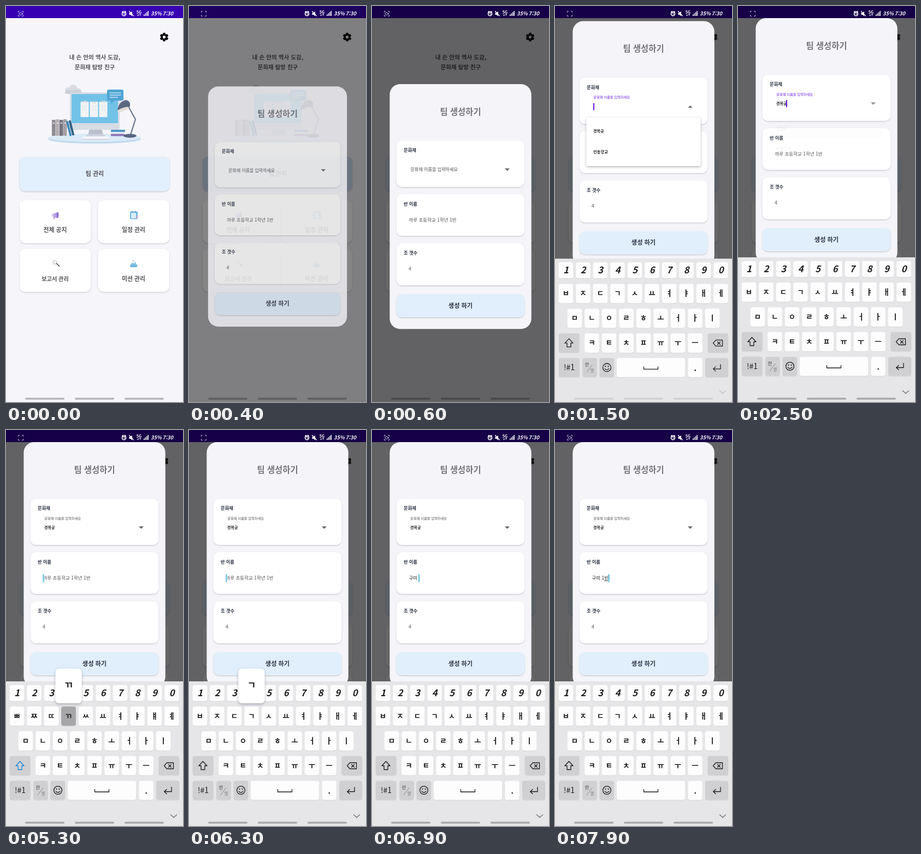
An HTML page for the animation above (8 s loop, 324 by 720 pixels).

```html
<!DOCTYPE html>
<html lang="ko">
<head>
<meta charset="utf-8">
<title>팀 생성하기</title>
<style>
html, body { margin: 0; width: 100%; height: 100%; overflow: hidden; background: #f5f5fa; }
svg { display: block; width: 324px; height: 720px; }
text { font-family: 'Noto Sans CJK KR', 'Noto Sans CJK', sans-serif; white-space: pre; }
.slant { font-style: italic; }
</style>
</head>
<body>
<svg id="stage" viewBox="0 0 324 720" xmlns="http://www.w3.org/2000/svg"></svg>
<script>
const LOOP = 8000;
const stage = document.getElementById('stage');
const $ = id => document.getElementById(id);

// ---------- markup helpers ----------
const box = (x, y, w, h, r, fill, more = '') =>
  `<rect x="${x}" y="${y}" width="${w}" height="${h}" rx="${r}" fill="${fill}" ${more}/>`;
const path = (d, fill, more = '') => `<path d="${d}" fill="${fill}" ${more}/>`;
const line = (d, color, w, more = '') =>
  path(d, 'none', `stroke="${color}" stroke-width="${w}" stroke-linecap="round" stroke-linejoin="round" ${more}`);
const oval = (x, y, rx, ry, fill, more = '') =>
  `<ellipse cx="${x}" cy="${y}" rx="${rx}" ry="${ry}" fill="${fill}" ${more}/>`;
// y is the middle of the glyphs
const label = (x, y, size, str, fill, weight = 500, anchor = 'middle', more = '') =>
  `<text x="${x}" y="${y + size * 0.36}" font-size="${size}" font-weight="${weight}" fill="${fill}" text-anchor="${anchor}" ${more}>${str}</text>`;
const group = (id, body, more = '') => `<g id="${id}" ${more}>${body}</g>`;
const LIFT = 'filter="url(#lift)"';

// ---------- home screen ----------
function gear() {
  let teeth = '';
  for (let a = 0; a < 360; a += 60)
    teeth += box(-2.2, -7.8, 4.4, 5, 0.8, '#000', `transform="rotate(${a})"`);
  return `<g transform="translate(289.5 56.5)">${teeth}<circle r="4.3" fill="none" stroke="#000" stroke-width="3.2"/></g>`;
}

function desk() {
  let s = oval(162, 242, 85, 8, '#bfd9ec') + oval(162, 239.5, 85, 7.5, '#dbeaf6');
  // cloud
  s += [[114, 154, 6], [123, 150.5, 7.5], [132, 155, 5.5]].map(([x, y, r]) => oval(x, y, r, r, '#d9dce2')).join('');
  s += box(108, 153, 30, 7, 3.5, '#cbcfd7');
  // monitor
  s += path('M153 222h22l3 14h-28z', '#b9c0cd') + oval(164, 236, 18, 3.5, '#ccd2dd');
  s += box(117, 157, 91, 68, 3, '#d6dbe4') + box(120, 160, 85, 53, 1.5, '#72c2e8');
  [137, 154, 171].forEach((x, i) => {
    s += box(x - 0.5, 174, 15, 28, 1, '#f1f3f5') + box(x + 4, 172.5 + i % 2, 7, 3, 1, '#d6dce3');
    s += line(`M${x + 3} 181h9M${x + 3} 185h7M${x + 3} 189h8`, '#d5d9dd', 0.7);
  });
  // speech bubble
  s += path('M188 152h24q3 0 3 3v14q0 3-3 3h-14l-6 6v-6h-4q-3 0-3-3v-14q0-3 3-3z', '#4fa5d3');
  s += line('M190 158h20M190 162h20M190 166h14', '#c6e5f5', 1.4);
  // keyboard
  s += path('M140 237h47l3 5h-53z', '#f2f4f8') + line('M138 242.5h51', '#b9c4d2', 1);
  // books
  ['#8e8b93', '#b5b0b2', '#77757f', '#a5a1a6'].forEach((c, i) =>
    s += box(84 + i * 7, 207 - i % 2, 6.5, 29 + i % 2, 1, c) + box(85.5 + i * 7, 212, 3.5, 2, 0, '#dedbe0'));
  s += `<g transform="rotate(-14 118 222)">${box(113, 208, 4, 28, 1, '#3f88b5')}${box(118, 208, 4, 28, 1, '#2e5f86')}</g>`;
  s += box(192, 225, 26, 4, 1, '#4f97c6') + box(191, 229, 27, 3.5, 1, '#e9ecf4') + box(192, 232.5, 25, 4, 1, '#8d74b4');
  // lamp
  s += line('M223 181L237 206L228 234', '#6a7691', 2.2) + oval(227, 236, 12, 3.5, '#5a6682');
  s += path('M204 190q2-17 16-19q10 3 6 13z', '#5d6883') + oval(214.5, 188, 11, 3, '#e3dfd6', 'transform="rotate(-18 214.5 188)"');
  return s;
}

function home() {
  const dark = '#55555a';
  let s = box(0, 0, 324, 720, 0, '#f5f5fa') + box(0, 0, 324, 22, 0, '#3700b3') + gear();
  s += label(162.5, 93.5, 10.6, '내 손 안의 역사 도감,', dark, 600) + label(162.5, 111.5, 10.5, '문화재 탐방 친구', dark, 600);
  s += desk();
  s += box(25, 274, 274, 62.5, 9, '#e2effd', LIFT);
  s += box(25, 274, 274, 62.5, 9, '#7d9fc4', 'id="tap" opacity="0"');
  s += label(162.5, 305, 11, '팀 관리', dark, 600);
  [[25, 353, '전체 공지', 10.8], [168.5, 353, '일정 관리', 10.8], [25, 441.5, '보고서 관리', 10.2], [168.5, 441.5, '미션 관리', 10.8]]
    .forEach(([x, y, name, size]) =>
      s += box(x, y, 130.3, 78.3, 10, '#fff', LIFT) + label(x + 65, y + 54.5, size, name, dark, 600));
  // megaphone, planner, magnifier, mission
  s += path('M86 378l8-3v11l-8-3z', '#b7a2e4') + box(83.5, 377.5, 4, 5.5, 1.5, '#d3c6f0') + oval(94.5, 380, 2, 5.5, '#8d72cc') + line('M87.5 384l1 3', '#a58ddc', 1.8);
  s += box(227, 373.5, 14, 14, 2, '#6db6e2') + box(229, 376, 9, 10, 1, '#d9eefb') + line('M231 372.5v3M237 372.5v3', '#6c87a3', 1) + path('M237 386l4-6 1 5z', '#dba6c0');
  s += path('M86 461l7 2-2 10-7-3z', '#ededf1') + line('M92 467.5l5.5 5.5', '#444', 1.6) + '<circle cx="90" cy="465.5" r="2.8" fill="#fff" stroke="#bbb" stroke-width="0.9"/>';
  s += path('M228 471l3-5 3 2 3-3 2 6z', '#8cc6e9') + box(227, 470, 13.5, 5, 2, '#74b8e0') + oval(233, 463.5, 2, 1.8, '#d4d9e2');
  return s;
}

// ---------- dialog ----------
function dialog() {
  const ink = '#2a3142', gray = '#505054';
  let s = box(32.4, 142, 259.3, 445.3, 19, '#f5f5f9');
  s += label(162, 192, 15.4, '팀 생성하기', '#75757a', 600);
  [[245, 84], [342, 76], [431.5, 76.5]].forEach(([y, h]) => s += box(44.8, y, 234.4, h, 10, '#fff', LIFT));
  s += box(44.8, 524, 234.4, 42, 10, '#e1effc', LIFT) + label(162, 544.5, 11.2, '생성 하기', ink, 700);
  s += label(58, 262, 8.3, '문화재', ink, 800, 'start') + label(58, 360, 8.2, '반 이름', ink, 800, 'start') + label(58, 449, 8.3, '조 갯수', ink, 800, 'start');
  s += label(0, 0, 8.1, '문화재 이름을 입력하세요', gray, 500, 'start', 'id="float"');
  s += label(70, 297.5, 7, '경복궁', '#222', 700, 'start', 'id="picked"');
  s += box(70, 291, 2, 13, 0, '#6a1ee0', 'id="bar"');
  s += path('M-4.5 -2.2h9l-4.5 4.5z', '#666', 'id="arrow"');
  s += label(67.5, 389, 8.5, '', gray, 500, 'start', 'id="field"');
  s += line('', '#222', 0.8, 'id="under"');
  s += group('caret', box(-1.8, -7.3, 3.6, 14.6, 0.5, '#a9e0f2') + box(-0.5, -7, 1, 14, 0, '#5fb3cd'));
  s += label(67, 478, 8.6, '4', gray, 500, 'start');
  s += group('menu', box(57.5, 317.5, 209, 88, 3, '#fff', 'filter="url(#high)"') +
    box(57.5, 323, 209, 38, 0, '#000', 'id="pick" opacity="0"') +
    label(70, 342, 7, '경복궁', '#222', 700, 'start') + label(70, 379.5, 7.3, '인동향교', '#222', 700, 'start'));
  return s;
}

// ---------- keyboard ----------
const STEP = 31.5, PLAIN = 'ㅂㅈㄷㄱㅅㅛㅕㅑㅐㅔ', SHIFTED = 'ㅃㅉㄸㄲㅆㅛㅕㅑㅒㅖ';
const ROWS = [
  { chars: '1234567890', x: 20, y: 463.7, h: 29, size: 16.5, style: 'class="slant"' },
  { chars: PLAIN, x: 20, y: 502.8, h: 35, size: 13.5, style: '' },
  { chars: 'ㅁㄴㅇㄹㅎㅗㅓㅏㅣ', x: 36, y: 547.8, h: 35, size: 13.5, style: '' },
  { chars: 'ㅋㅌㅊㅍㅠㅜㅡ', x: 67.5, y: 592.8, h: 35, size: 13.5, style: '' }
];
const spots = {};

function keyboard() {
  const pale = '#fdfdfd', tone = '#d0d0d2', ink = '#1c1c1e';
  const key = (x, y, w, h, fill, more = '') => box(x, y, w, h, 4, fill, `filter="url(#key)" ${more}`);
  const low = (x, w, fill, more) => key(x, 637.7, w, 34.7, fill, more);
  let s = box(0, 457, 324, 270, 0, '#e6e6e8');
  ROWS.forEach((row, r) => [...row.chars].forEach((ch, i) => {
    const x = row.x + i * STEP;
    spots[ch] = [x, row.y];
    s += key(x - 13.3, row.y, 26.6, row.h, pale, `id="k${r}_${i}"`);
    s += label(x, row.y + row.h / 2 - 0.3, row.size, ch, ink, 600, 'middle', `id="c${r}_${i}" ${row.style}`);
  }));
  s += key(6.7, 592.8, 38, 35, tone, 'id="shiftKey"') + line('M25.5 602.5l7.5 8h-4v7h-7v-7h-4z', ink, 1.3, 'id="shift"');
  s += key(279.5, 592.8, 37.7, 35, tone, 'id="back"') + line('M294.5 605h12v11h-12l-5-5.5zM297.5 608.2l5 5M302.5 608.2l-5 5', ink, 1.3);
  s += low(6.7, 38, tone) + label(26, 655, 14, '!#1', ink, 500);
  s += low(50, 26.7, tone) + label(58.5, 649.5, 8.5, '한', '#444') + label(68, 661, 7.5, '영', '#777') + line('M58 663.5l10-13', '#777', 0.8);
  s += low(81.5, 26.7, tone) + '<circle cx="95" cy="655" r="7.4" fill="none" stroke="#1c1c1e" stroke-width="1.3"/>' +
    oval(92.4, 652.8, 1.1, 1.1, ink) + oval(97.6, 652.8, 1.1, 1.1, ink) + line('M91.2 657q3.8 4.4 7.6 0', ink, 1.2);
  s += low(113, 125, pale, 'id="space"') + line('M162.5 653.5v4.5h26v-4.5', ink, 1.3);
  s += low(243.5, 26.2, pale) + oval(256.7, 660, 1.3, 1.3, ink);
  s += low(275, 42.2, tone) + line('M303 649.5v8h-13M294 653.5l-4.3 4 4.3 4', ink, 1.3);
  return s;
}

// ---------- status bar ----------
function status() {
  const w = '#fff', pale = '#cfc8e6';
  let s = line('M22.5 11.5v-2h2M29.5 9.5h2v2M31.5 16.5v2h-2M24.5 18.5h-2v-2', pale, 0.9);
  s += group('cam', box(24.2, 12, 4.8, 4.2, 1, 'none', `stroke="${pale}" stroke-width="0.9"`) + path('M29.2 14l1.8-1.5v3z', pale));
  s += `<circle cx="216" cy="14.3" r="3.4" fill="none" stroke="#fff" stroke-width="1.7"/>` + line('M212.5 11l2-1.7M219.5 11l-2-1.7M216 12.6v1.8l1.2.8', w, 1.2);
  s += path('M225.5 12.3h2.5l3-2.6v8.8l-3-2.6h-2.5z', w) + line('M225.5 9.5l8 8.5', w, 1.2);
  s += label(243.5, 11.2, 7.2, '5G', w, 800) + path('M240 17.5l1.7-2.4 1.7 2.4zM243.8 15.1h3.4l-1.7 2.4z', w);
  for (let i = 0; i < 4; i++) s += box(252 + i * 2.5, 15.5 - i * 2.2, 1.5, 2.5 + i * 2.2, 0, w);
  s += label(265, 13.8, 9.3, '35%', w, 700, 'start', 'class="slant"') + label(286.5, 13.8, 9.3, '7:30', w, 700, 'start', 'class="slant"');
  return s;
}

const shade = (id, dy, blur, op) =>
  `<filter id="${id}" x="-10%" y="-20%" width="120%" height="150%"><feDropShadow dx="0" dy="${dy}" stdDeviation="${blur}" flood-color="#334" flood-opacity="${op}"/></filter>`;

stage.innerHTML = `<defs>${shade('lift', 1.1, 0.9, 0.27)}${shade('high', 1.5, 2.2, 0.4)}${shade('key', 0.6, 0.4, 0.15)}</defs>` +
  home() + group('homeBars', '') + box(0, 0, 324, 720, 0, '#000', 'id="dim"') +
  group('dialog', dialog()) + group('keys', keyboard()) +
  group('foot', line('M301.5 699.5l5.5 5 5.5-5', '#77777b', 1.5) + group('keyBars', '')) +
  group('popup', box(-24, 0, 48, 63, 6, '#fff', 'filter="url(#high)"') + label(0, 30.5, 17, '', '#1c1c1e', 600, 'middle', 'id="popChar"')) +
  status();
['homeBars', 'keyBars'].forEach((id, n) =>
  $(id).innerHTML = [35, 126, 217].map(x => box(x, 712.3, 72, 3.4, 1.7, n ? '#a9a9ac' : '#b6b6ba')).join(''));

// ---------- timeline ----------
const HINT = '까루 초등학교 1학년 1반';
const TYPED = [[0, ''], [5400, 'ㄲ'], [5500, ''], [6400, 'ㄱ'], [6500, '구'], [6600, '굼'], [6700, '구미'],
  [6900, '구미 '], [7200, '구미 1'], [7300, '구미 1ㅂ'], [7400, '구미 1바'], [7600, '구미 1반']];
const PRESSED = [[5300, 'ㄲ'], [6300, 'ㄱ'], [6400, 'ㅜ'], [6500, 'ㅁ'], [6600, 'ㅣ'], [7100, '1'], [7200, 'ㅂ'], [7300, 'ㅏ'], [7500, 'ㄴ']];

const ramp = (t, a, b) => Math.min(1, Math.max(0, (t - a) / (b - a)));
const easeOut = p => 1 - (1 - p) ** 3;
const mix = (a, b, p) => a + (b - a) * p;
const within = (t, a, b) => t >= a && t < b;
const set = (id, attrs) => { for (const k in attrs) $(id).setAttribute(k, attrs[k]); };
const show = (id, on) => set(id, { visibility: on ? 'visible' : 'hidden' });
const blink = (t, from) => t >= from && Math.floor((t - from) / 500) % 2 === 0;
const advance = str => [...str].reduce((w, c) => w + (c === ' ' ? 0.22 : /\d/.test(c) ? 0.555 : 0.92), 0) * 8.5;

function drawDialog(t) {
  const open = easeOut(ramp(t, 300, 540));
  const up = -120 * easeOut(ramp(t, 1200, 1670));
  const k = mix(0.9, 1, open);
  set('tap', { opacity: 0.3 * ramp(t, 100, 250) * (1 - ramp(t, 350, 550)) });
  set('dim', { opacity: 0.6 * open });
  set('dialog', { opacity: open, transform: `translate(162 ${364 + up}) scale(${k}) translate(-162 -364)` });

  // culture field
  const rise = easeOut(ramp(t, 1000, 1180));
  const focused = within(t, 1000, 3000);
  set('float', {
    transform: `translate(70.5 ${mix(297.5, 280.3, rise)}) scale(${mix(1, 0.77, rise)})`,
    fill: focused ? '#6a1ee0' : '#505054'
  });
  show('picked', t >= 2300);
  set('bar', { x: t >= 2300 ? 88 : 70 });
  show('bar', focused && (t < 2400 ? blink(t, 1100) : blink(t, 2400)));
  const listed = within(t, 1050, 2300);
  set('arrow', { transform: `translate(247.5 297.5) scale(${listed ? 0.9 : 1} ${listed ? -0.9 : 1})`, fill: within(t, 2300, 3000) ? '#949496' : '#666' });
  set('menu', { opacity: ramp(t, 1050, 1200) * (1 - ramp(t, 2300, 2510)) });
  show('menu', within(t, 1050, 2510));
  set('pick', { opacity: 0.1 * ramp(t, 1900, 2100) });

  // class field
  const str = TYPED.filter(e => t >= e[0]).pop()[1];
  $('field').textContent = str || HINT;
  set('field', { fill: str ? '#1d1d1f' : '#505054' });
  const end = 67.5 + advance(str);
  const composing = /[ㄱ-ㅎ가-힣]$/.test(str);
  set('under', { d: composing ? `M${end - 7.5} 394.2H${end - 0.5}` : '' });
  const reset = t >= 7600 ? 7600 : t >= 6300 ? t : t >= 5500 ? 5500 : 3000;
  set('caret', { transform: `translate(${end + 1} 389.5)` });
  show('caret', blink(t, reset));
}

function drawKeys(t) {
  const slide = easeOut(ramp(t, 1200, 1580));
  set('keys', { transform: `translate(0 ${265 * (1 - slide)})` });
  show('keys', t >= 1200);
  set('foot', { opacity: ramp(t, 1400, 1700) });

  const shift = within(t, 3800, 5400);
  [...(shift ? SHIFTED : PLAIN)].forEach((c, i) => $('c1_' + i).textContent = c);
  set('shift', { stroke: shift ? '#1686d8' : '#1c1c1e' });
  const press = (id, on, idle) => set(id, { fill: on ? '#a6a6a8' : idle });
  press('shiftKey', within(t, 3800, 3900), '#d0d0d2');
  press('back', within(t, 5500, 5600), '#d0d0d2');
  press('space', within(t, 6800, 6900), '#fdfdfd');
  press('k1_3', within(t, 5300, 5400), '#fdfdfd');

  const hit = PRESSED.find(e => within(t, e[0], e[0] + 100));
  show('popup', !!hit);
  if (hit) {
    const [x, y] = spots[hit[1] === 'ㄲ' ? 'ㄱ' : hit[1]];
    $('popChar').textContent = hit[1];
    set('popup', { transform: `translate(${Math.max(30.5, x)} ${y - 69})` });
  }
}

function draw(t) {
  drawDialog(t);
  drawKeys(t);
  show('cam', t < 100 || t % 1000 >= 600);
}

const start = performance.now();
function tick() {
  draw((performance.now() - start) % LOOP);
  requestAnimationFrame(tick);
}
draw(0);
requestAnimationFrame(tick);
</script>
</body>
</html>
```
